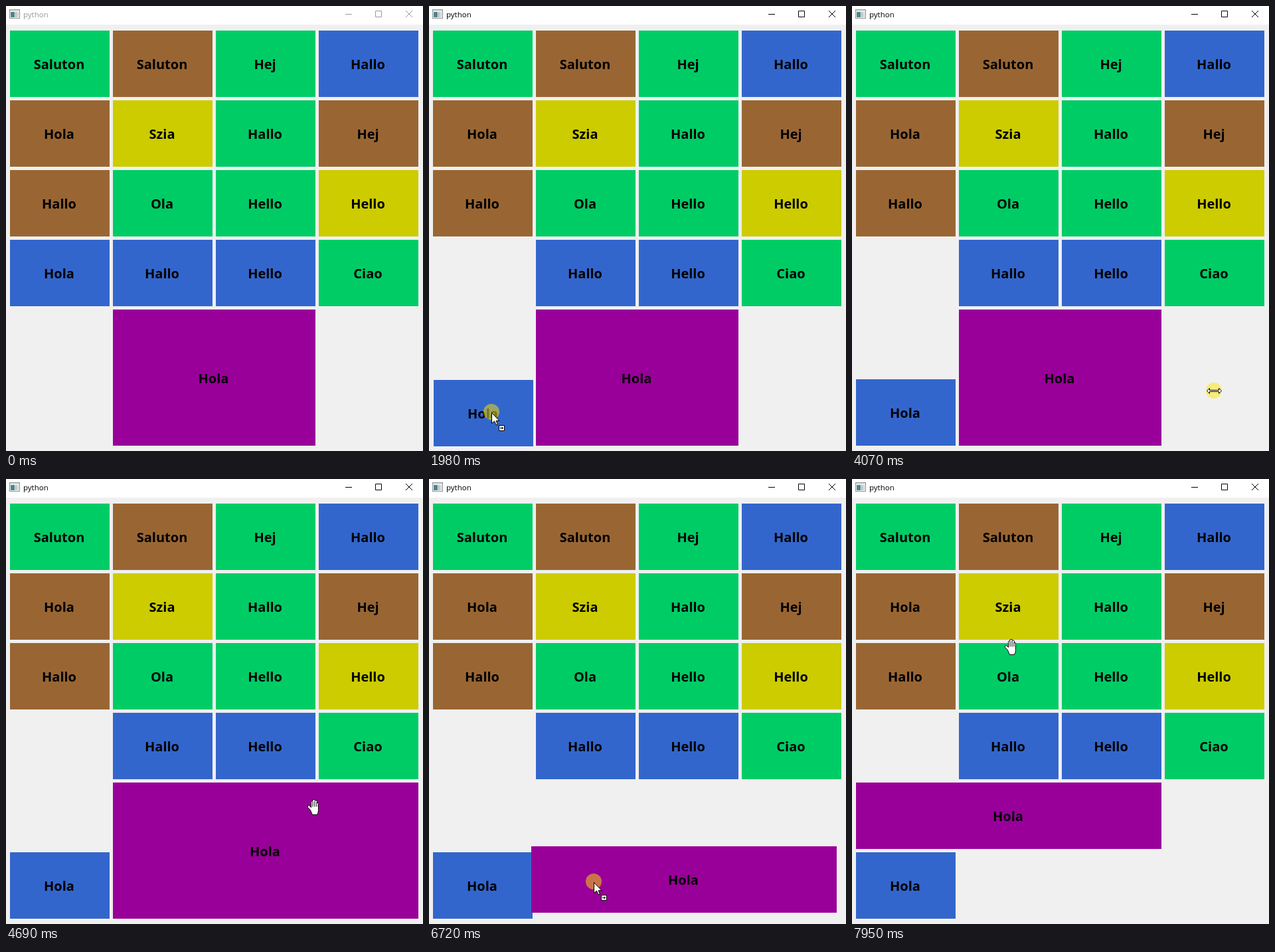
These frames come from a looping animation (628 by 670 pixels, 8000 ms). An HTML page with a canvas:

```html
<!DOCTYPE html>
<html lang="en">
<head>
<meta charset="utf-8">
<title>python</title>
<style>
html, body { margin: 0; width: 100%; height: 100%; overflow: hidden; background: #f0f0f0; }
canvas { display: block; }
</style>
</head>
<body>
<canvas id="stage" width="628" height="670"></canvas>
<script>
const ctx = document.getElementById('stage').getContext('2d');
const LOOP = 8000, STEP = 77.5;
const BLUE = '#3366cc', GREEN = '#00cc66', BROWN = '#996633', YELLOW = '#cccc00', PURPLE = '#990099';

// Fixed tiles in rows of four; the gap is the place of the movable tile
const tiles = [
  ['Saluton', GREEN], ['Saluton', BROWN], ['Hej', GREEN], ['Hallo', BLUE],
  ['Hola', BROWN], ['Szia', YELLOW], ['Hallo', GREEN], ['Hej', BROWN],
  ['Hallo', BROWN], ['Ola', GREEN], ['Hello', GREEN], ['Hello', YELLOW],
  null, ['Hallo', BLUE], ['Hello', BLUE], ['Ciao', GREEN]
];

// Pointer path: time, x, y, shape, pressed
const keys = [
  [280, 486, 660, 'arrow'], [340, 458, 640, 'hand'], [560, 262, 512, 'hand'],
  [760, 135, 430, 'hand'], [960, 93, 400, 'hand'],
  [1290, 93, 400, 'drag', 1], [1370, 93, 402, 'drag', 1], [1600, 93, 490, 'drag', 1],
  [1800, 94, 588, 'drag', 1], [1960, 94, 611, 'drag', 1], [2055, 94, 612, 'drag', 1],
  [2140, 94, 612, 'arrow'], [2215, 94, 612, 'arrow'], [2285, 112, 612, 'hand'],
  [2600, 330, 600, 'hand'], [2820, 452, 588, 'hand'], [2900, 470, 580, 'arrow'],
  [2980, 471, 580, 'arrow'], [3160, 471, 580, 'arrow'], [3200, 467, 580, 'ew'],
  [3430, 464, 580, 'ew'], [3760, 464, 579, 'ew', 1], [3800, 468, 579, 'ew', 1],
  [4210, 579, 579, 'ew', 1], [4365, 579, 580, 'ew'], [4530, 579, 584, 'hand'],
  [4560, 572, 582, 'hand'], [4690, 462, 494, 'hand'], [4710, 462, 494, 'hand'],
  [5050, 462, 460, 'ns'], [5390, 462, 460, 'ns', 1], [5440, 462, 462, 'ns', 1],
  [5780, 460, 562, 'ns', 1], [5855, 455, 566, 'hand'], [6170, 255, 608, 'hand'],
  [6250, 255, 615, 'drag', 1], [6560, 255, 615, 'drag', 1], [6720, 248, 606, 'drag', 1],
  [7010, 151, 507, 'drag', 1], [7250, 122, 505, 'drag', 1], [7405, 122, 505, 'arrow'],
  [7565, 122, 505, 'arrow'], [7635, 142, 462, 'hand'], [7800, 212, 310, 'hand'],
  [7945, 238, 253, 'hand'], [8100, 238, 253, 'hand']
];

function pointerAt(t) {
  const i = keys.findIndex(k => k[0] > t) - 1;
  if (i < 0) return null;
  const [t0, x0, y0, shape, pressed] = keys[i], [t1, x1, y1] = keys[i + 1];
  const p = (t - t0) / (t1 - t0);
  return { x: Math.round(x0 + (x1 - x0) * p), y: Math.round(y0 + (y1 - y0) * p), shape, pressed };
}

function rect(x, y, w, h, color) {
  ctx.fillStyle = color;
  ctx.fillRect(x, y, w, h);
}

function tile(x, y, w, h, text, color) {
  rect(x, y, w, h, color);
  ctx.fillStyle = '#000';
  ctx.font = 'bold 20px "Open Sans", "Noto Sans", sans-serif';
  ctx.textAlign = 'center';
  ctx.fillText(text, x + w / 2 - 1, y + h / 2 + 8);
}

function lines(d, color) {
  ctx.strokeStyle = color;
  ctx.lineWidth = 1;
  ctx.stroke(new Path2D(d));
}

function titleBar(active) {
  const ink = active ? '#000' : '#999';
  rect(0, 0, 628, 28, '#fff');
  rect(5, 5, 16, 14, '#8a9298');
  rect(6, 6, 14, 2, '#d8dcde');
  rect(6, 8, 14, 10, '#f4f6f6');
  rect(7, 9, 6, 8, '#4d8585');
  rect(14, 9, 2, 8, '#a9b4b8');
  rect(17, 9, 2, 8, '#c8d0d3');
  ctx.fillStyle = ink;
  ctx.font = '11.5px "Open Sans", "Noto Sans", sans-serif';
  ctx.textAlign = 'left';
  ctx.fillText('python', 26, 17);
  lines('M511 12.5h10M556.5 7.5h9v9h-9zM602 7l10 10M612 7l-10 10', ink);
}

function shape(d, fill = '#fff') {
  const path = new Path2D(d);
  ctx.fillStyle = fill;
  ctx.fill(path);
  ctx.strokeStyle = '#000';
  ctx.lineWidth = 1;
  ctx.stroke(path);
}

function pointer({ x, y, shape: kind, pressed }) {
  if (pressed) {
    ctx.fillStyle = 'rgba(255,230,0,.5)';
    ctx.beginPath();
    ctx.arc(x, y, 12, 0, 7);
    ctx.fill();
  }
  ctx.save();
  ctx.translate(x + .5, y + .5);
  if (kind === 'hand') {
    shape('M-4 4L-8 0Q-9-3-6-3L-3 0V-8Q-3-10-1-9.5Q-1-12 1-12Q3-12 3-10.5Q5-11.5 6-9V-7Q8-8 8-5V4Q8 8 6 11H-1Q-3 7-4 4Z');
    lines('M-.5-9V-1M2.5-10V-1M5.5-8V-1', '#000');
  } else if (kind === 'ew' || kind === 'ns') {
    if (kind === 'ns') ctx.rotate(Math.PI / 2);
    shape('M-11 0l4-4v3H7v-3l4 4-4 4V1H-7v3z');
  } else {
    const drag = kind === 'drag';
    if (drag) ctx.translate(0, 1);
    shape('M0 0V16L4 12.5 6.5 18H9L6.7 12H11.5Z', drag ? '#ffffe4' : '#fff');
    if (drag) {
      shape('M11 19h8v8h-8z');
      lines('M12.5 23H17M15 21l2 2-2 2', '#000');
    }
  }
  ctx.restore();
}

function draw(now) {
  // The screen refreshes in even steps
  const time = now % LOOP;
  const t = 288 + STEP * Math.floor((time - 260) / STEP);
  const ptr = time < 280 ? null : pointerAt(Math.max(t, 280));

  rect(0, 0, 628, 670, '#f0f0f0');
  titleBar(t >= 1290);
  tiles.forEach((cell, i) => {
    if (cell) tile(6 + i % 4 * 155, 37 + (i >> 2) * 105, 150, 100, ...cell);
  });

  let small = [6, 352];
  if (t >= 2140) small = [6, 562];
  else if (t >= 1290) small = [ptr.x - 87, ptr.y - 48];
  tile(...small, 150, 100, 'Hola', BLUE);

  let big = [161, 457, 305, 205];
  if (t >= 7405) big = [6, 457, 460, 100];
  else if (t >= 6250) big = [ptr.x - 94, ptr.y - 53, 460, 100];
  else if (t >= 5855) big = [161, 562, 460, 100];
  else if (t >= 4365) big = [161, 457, 460, 205];
  tile(...big, 'Hola', PURPLE);

  if (ptr) pointer(ptr);
}

let start;
function tick(now) {
  start ??= now;
  draw(now - start);
  requestAnimationFrame(tick);
}
requestAnimationFrame(tick);
</script>
</body>
</html>
```
